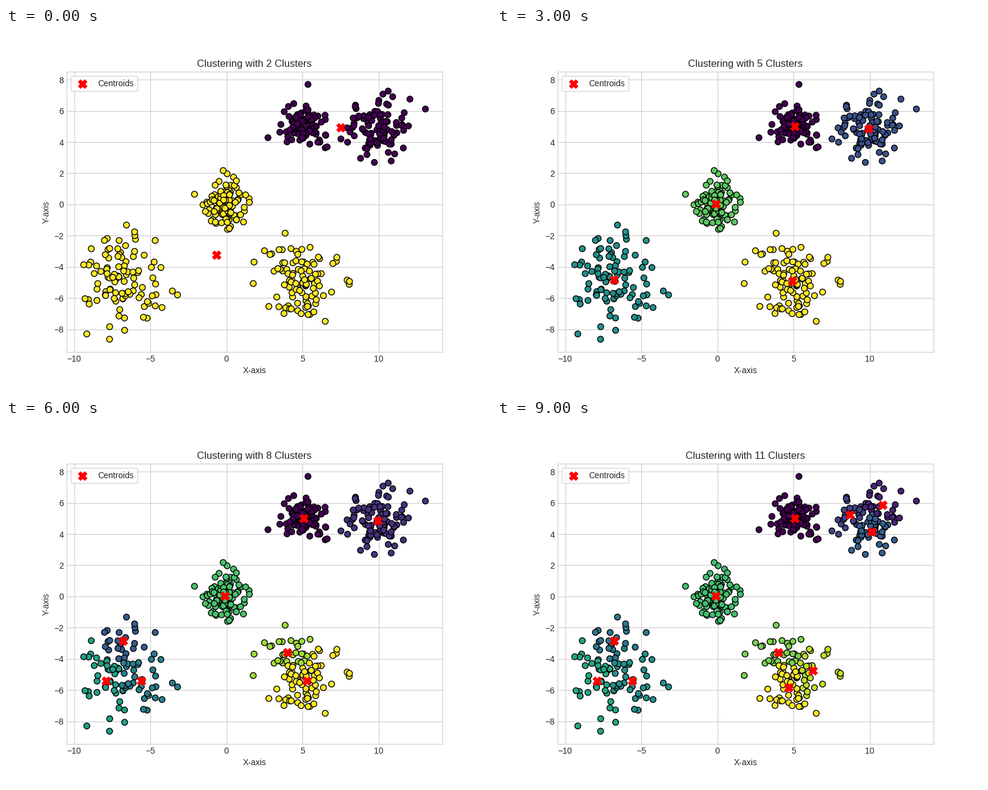
Animation, 800 px wide and 600 px high, one loop 10000 ms. Source, as a matplotlib script:

```python
import numpy as np
import matplotlib.pyplot as plt
from matplotlib.animation import FuncAnimation

plt.rcParams.update({
    "font.family": "Liberation Sans",
    "text.color": "0.15",
    "axes.labelcolor": "0.15",
    "xtick.color": "0.15",
    "ytick.color": "0.15",
    "axes.edgecolor": "0.8",
    "axes.grid": True,
    "axes.axisbelow": True,
    "grid.color": "0.8",
    "xtick.major.size": 0,
    "ytick.major.size": 0,
})

SIZE = 100
BLOBS = [(0, 0, 0.8), (5, 5, 0.7), (10, 5, 1.0), (5, -5, 1.2), (-7, -5, 1.5)]
MAX_K = 11


def make_points():
    rng = np.random.RandomState(42)
    pts = np.vstack([rng.normal((x, y), s, (SIZE, 2)) for x, y, s in BLOBS])
    order = np.arange(len(pts))
    rng.shuffle(order)
    return pts[order]


def ward_tree(pts):
    """Merge the closest pair repeatedly; return members and children by node id."""
    n = len(pts)
    dist = ((pts[:, None] - pts[None]) ** 2).sum(-1)
    np.fill_diagonal(dist, np.inf)
    count = np.ones(n)
    node = list(range(n))
    members = [[i] for i in range(n)]
    children = {}
    for _ in range(n - 1):
        i, j = divmod(int(dist.argmin()), n)
        gap, ni, nj = dist[i, j], count[i], count[j]
        row = ((ni + count) * dist[i] + (nj + count) * dist[j] - count * gap)
        row /= ni + nj + count
        row[[i, j]] = np.inf
        dist[i] = dist[:, i] = row
        dist[j] = dist[:, j] = np.inf
        count[i] += nj
        left, right = sorted((node[i], node[j]))
        node[i] = len(members)
        children[node[i]] = [left, right]
        members.append(members[left] + members[right])
    return members, children


def cut_tree(members, children):
    """Labels for 2 to MAX_K clusters, numbered in tree order."""
    groups = [len(members) - 1]
    cuts = []
    while len(groups) < MAX_K:
        top = groups.index(max(groups))
        groups[top:top + 1] = children[groups[top]]
        labels = np.empty(len(members[-1]), int)
        for lab, g in enumerate(groups):
            labels[members[g]] = lab
        cuts.append(labels)
    return cuts


points = make_points()
cuts = cut_tree(*ward_tree(points))

fig, ax = plt.subplots(figsize=(8, 6), dpi=100)
dots = ax.scatter(*points.T, s=50, c=np.zeros(len(points)), cmap="viridis",
                  vmin=0, vmax=1, edgecolors="k")
marks = ax.scatter([0], [0], s=100, c="red", marker="X", label="Centroids")
title = ax.set_title("")
ax.set_xlabel("X-axis")
ax.set_ylabel("Y-axis")
ax.legend(loc="upper left")


def draw(i):
    labels, k = cuts[i], i + 2
    dots.set_array(labels / (k - 1))
    marks.set_offsets([points[labels == c].mean(axis=0) for c in range(k)])
    title.set_text(f"Clustering with {k} Clusters")
    return dots, marks, title


anim = FuncAnimation(fig, draw, frames=len(cuts), interval=1000, repeat=True)
plt.show()
```
